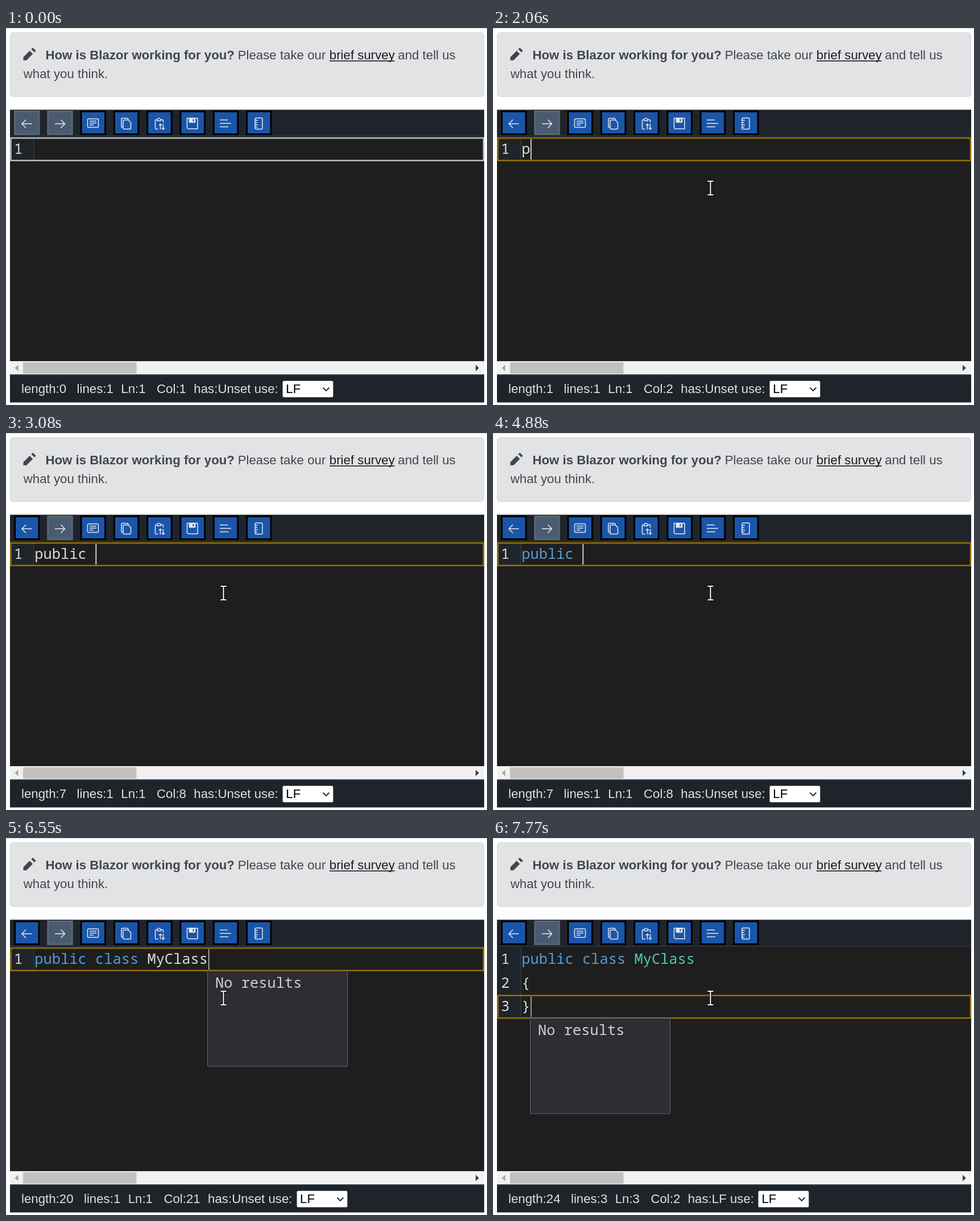
An HTML page that plays this animation: 846 by 662 pixels, repeating every 8 s.

```html
<!DOCTYPE html>
<html lang="en">
<head>
<meta charset="utf-8">
<title>Code editor typing</title>
<style>
  html, body { margin: 0; width: 100%; height: 100%; overflow: hidden; background: #fff; }
  svg { position: absolute; left: 0; top: 0; }
  text { white-space: pre; }
  .sans, #status { font: 22.25px "Liberation Sans", Arial, sans-serif; }
  .code { font: 25.42px "Noto Sans Mono", "DejaVu Sans Mono", monospace; fill: #dcdcdc; }
  .keyword { fill: #569cd6; }
  .type { fill: #4ec9b0; }
  .icon { fill: none; stroke: #e6e9ee; stroke-width: 1.5; }
  #status { position: absolute; left: 27px; top: 619px; height: 30px; display: flex;
            line-height: 30px; color: #e0e0e0; white-space: pre; }
  #select { box-sizing: border-box; width: 90px; height: 30px; margin-left: 7.5px; padding-left: 5px;
            border: 1.5px solid #767676; border-radius: 3px; background: #fff; color: #000;
            line-height: 27px; position: relative; }
  #select svg { left: 69px; top: 9px; }
</style>
</head>
<body>
<svg width="846" height="662" viewBox="0 0 846 662">
  <rect width="846" height="1" fill="#d8d8d8"/>
  <rect x="7.5" y="8" width="833" height="112.5" rx="5" fill="#e2e3e5" stroke="#d3d6d8"/>
  <path transform="translate(30.5 34.5) scale(2.78)" fill="#41464b"
        d="M6 0l-1 1 2 2 1-1-2-2zm-2 2l-4 4v2h2l4-4-2-2z"/>
  <g class="sans" fill="#41464b">
    <text x="69.4" y="55" font-weight="bold">How is Blazor working for you?</text>
    <text x="407.7" y="55">Please take our</text>
    <text x="568.8" y="55" fill="#1a1e21">brief survey</text>
    <text x="689.3" y="55">and tell us</text>
    <text x="30.8" y="88">what you think.</text>
  </g>
  <rect x="569" y="57" width="114.5" height="1.6" fill="#1a1e21"/>

  <rect x="7" y="143.5" width="834" height="514" fill="#1f232a"/>
  <rect x="7" y="189" width="834" height="2" fill="#24343d"/>
  <rect x="7" y="191" width="834" height="394" fill="#1e1e1e"/>
  <g id="buttons"></g>
  <g class="icon">
    <path d="M28 168.3H45.5M35 161l-7 7.3 7 7.3"/>
    <path d="M86 168.3H103.5M96.500 161l7 7.300-7 7.300"/>
    <rect x="143.500" y="159.500" width="19" height="15" rx="2"/>
    <path d="M147 163.500h12M147 167h12M147 170.500h7"/>
    <path d="M208 161.500h7l4.500 4.500v9.500a2 2 0 0 1-2 2h-9.500a2 2 0 0 1-2-2v-12a2 2 0 0 1 2-2M206 174.500h-1a2 2 0 0 1-2-2v-12a2 2 0 0 1 2-2h8a2 2 0 0 1 2 2v1"/>
    <path d="M266 161h-1.500a2 2 0 0 0-2 2v12.500a2 2 0 0 0 2 2h3M272 161h2.500a2 2 0 0 1 2 2v3M266 163v-2.500q3-4.500 6 0v2.500zM271.500 178v-9.500m-2.500 2.500l2.500-2.500 2.500 2.500M276.500 168.500v9.500m-2.500-2.500l2.500 2.500 2.500-2.500"/>
    <path d="M318.500 158.500h18.500v18.500h-16.500l-2-2z"/>
    <path d="M322.500 158.500h10v7h-10z" fill="#e6e9ee"/>
    <path d="M329.500 160v4" stroke="#1b55a8" stroke-width="2"/>
    <path d="M376 161.500h14M376 167.500h20M376 173.500h15"/>
    <rect x="438" y="158" width="13" height="19.500" rx="2"/>
    <path d="M438 162h5M438 166h4M438 170h5M438 174h4"/>
  </g>

  <g id="lines"></g>
  <rect id="row" x="8.500" width="831.5" height="39.500" fill="none" stroke-width="2.500"/>
  <rect id="caret" height="36" fill="#cfcfcf"/>
  <g id="popup">
    <rect x="0.500" y="0.500" width="246" height="167.500" rx="1" fill="#2d2d33" stroke="#69696c"/>
    <text class="code" x="14" y="30" style="fill:#d0d2c9">No results</text>
  </g>

  <rect x="7" y="585" width="834" height="23.500" fill="#f1f1f1"/>
  <rect x="30" y="587" width="199.500" height="20" fill="#c1c1c1"/>
  <path d="M21.500 591.500v11l-6-5.500z" fill="#a3a3a3"/>
  <path d="M826 591.500v11l6-5.500z" fill="#404040"/>
  <rect x="7" y="608.500" width="834" height="2" fill="#24343d"/>
</svg>
<div id="status">
  <span id="length" style="margin-right:18.4px"></span><span id="count" style="margin-right:13.400px"></span><span id="ln" style="margin-right:19.400px"></span><span id="col" style="margin-right:13.400px"></span><span id="ending"></span><div id="select">LF<svg width="14" height="10"><path d="M1.500 2.500l5.500 5.500 5.500-5.500" fill="none" stroke="#222" stroke-width="1.800"/></svg></div>
</div>
<svg width="846" height="662" viewBox="0 0 846 662">
  <g id="pointer">
    <g id="beam" fill="none">
      <path d="M-5-12h4l1 1 1-1h4M-5 12h4l1-1 1 1h4M0-11v22" stroke="#000" stroke-width="4"/>
      <path d="M-5-12h4l1 1 1-1h4M-5 12h4l1-1 1 1h4M0-11v22" stroke="#fff" stroke-width="2"/>
    </g>
    <path id="arrow" d="M0 0v22l5-5 4 8 3.500-1.500-4-8h7z" fill="#fff" stroke="#000"/>
  </g>
</svg>
<script>
const $ = id => document.getElementById(id);
const LOOP = 8000, CHAR = 15.25, ROW = 41.7;
const FOCUS = 960, FIRST_POPUP = 2140, KEYWORD_COLOR = 3150, TYPE_COLOR = 6970;
const TEXT = "public class MyClass\n{\n}";
const KEY_TIMES = [2060, 2260, 2470, 2610, 2800, 2940, 3080,
  4970, 5070, 5170, 5270, 5370, 5470,
  5680, 5880, 6150, 6350, 6410, 6480, 6550, 6900, 7490, 7630, 7770];
const CARET_OFF = [[1740, 2060], [3820, 4140], [4610, 4880]];

const set = (id, attrs) => {
  for (const name in attrs) $(id).setAttribute(name, attrs[name]);
};
const show = (id, on) => { $(id).style.display = on ? "" : "none"; };

function drawButtons(canUndo) {
  let html = "";
  for (let i = 0; i < 8; i++) {
    const enabled = i > 1 || (i === 0 && canUndo);
    html += `<rect x="${15.5 + i * 58.3}" y="146.5" width="42.5" height="40" stroke-width="3"
      fill="${enabled ? "#1b55a8" : "#4a5a70"}" stroke="${enabled ? "#000" : "#5b6670"}"/>`;
  }
  $("buttons").innerHTML = html;
}

function colorize(line, t) {
  if (t >= KEYWORD_COLOR) line = line.replace(/\b(public|class)(?= )/g, '<tspan class="keyword">$1</tspan>');
  if (t >= TYPE_COLOR) line = line.replace("MyClass", '<tspan class="type">MyClass</tspan>');
  return line;
}

function drawLines(lines, t) {
  $("lines").innerHTML = lines.map((line, i) => {
    const top = 192 + i * ROW, base = 221 + i * ROW;
    return `<rect x="8" y="${top}" width="40" height="${ROW}" fill="#1f232a"/>
      <rect x="48" y="${top}" width="2" height="${ROW}" fill="#26363f"/>
      <text class="code" x="14" y="${base}">${i + 1}</text>
      <text class="code" x="50.2" y="${base}">${colorize(line, t)}</text>`;
  }).join("");
}

function drawPointer(t) {
  show("pointer", t >= 70);
  const q = 70 + Math.floor((t - 70) / 70.5) * 70.5;
  const clamp = v => Math.max(0, Math.min(1, v));
  const ease = v => v * v * (3 - 2 * v);
  const enter = ease(clamp((q - 40) / 730));
  const leave = ease(clamp((q - 900) / 575));
  const x = 783 - 336 * enter - 64.5 * leave;
  const y = 664 - 440 * enter + 57 * leave;
  set("pointer", { transform: `translate(${x} ${y})` });
  show("beam", y < 585);
  show("arrow", y >= 585);
}

function draw(t) {
  const length = KEY_TIMES.filter(k => t >= k).length;
  const typed = TEXT.slice(0, length);
  const lines = typed.split("\n");
  const row = lines.length - 1;
  const col = lines[row].length;
  const caretX = 51.6 + CHAR * col;
  const thin = t >= 4970;

  drawButtons(length > 0);
  drawLines(lines, t);
  set("row", { y: 193.2 + row * ROW, stroke: t >= FOCUS ? "#967000" : "#bdbdbd" });
  set("caret", { x: caretX - (thin ? 0.6 : 1), y: 195 + row * ROW, width: thin ? 1.4 : 2 });
  show("caret", t >= FOCUS && !CARET_OFF.some(([from, to]) => t >= from && t < to));
  set("popup", { transform: `translate(${Math.round(caretX - 2.2)} ${Math.round(233 + row * ROW)})` });
  show("popup", t >= FIRST_POPUP && /\S$/.test(typed));

  $("length").textContent = "length:" + length;
  $("count").textContent = "lines:" + lines.length;
  $("ln").textContent = "Ln:" + (row + 1);
  $("col").textContent = "Col:" + (col + 1);
  $("ending").textContent = `has:${row ? "LF" : "Unset"} use:`;
  drawPointer(t);
}

const start = performance.now();
function tick() {
  draw((performance.now() - start) % LOOP);
  requestAnimationFrame(tick);
}
tick();
</script>
</body>
</html>
```
